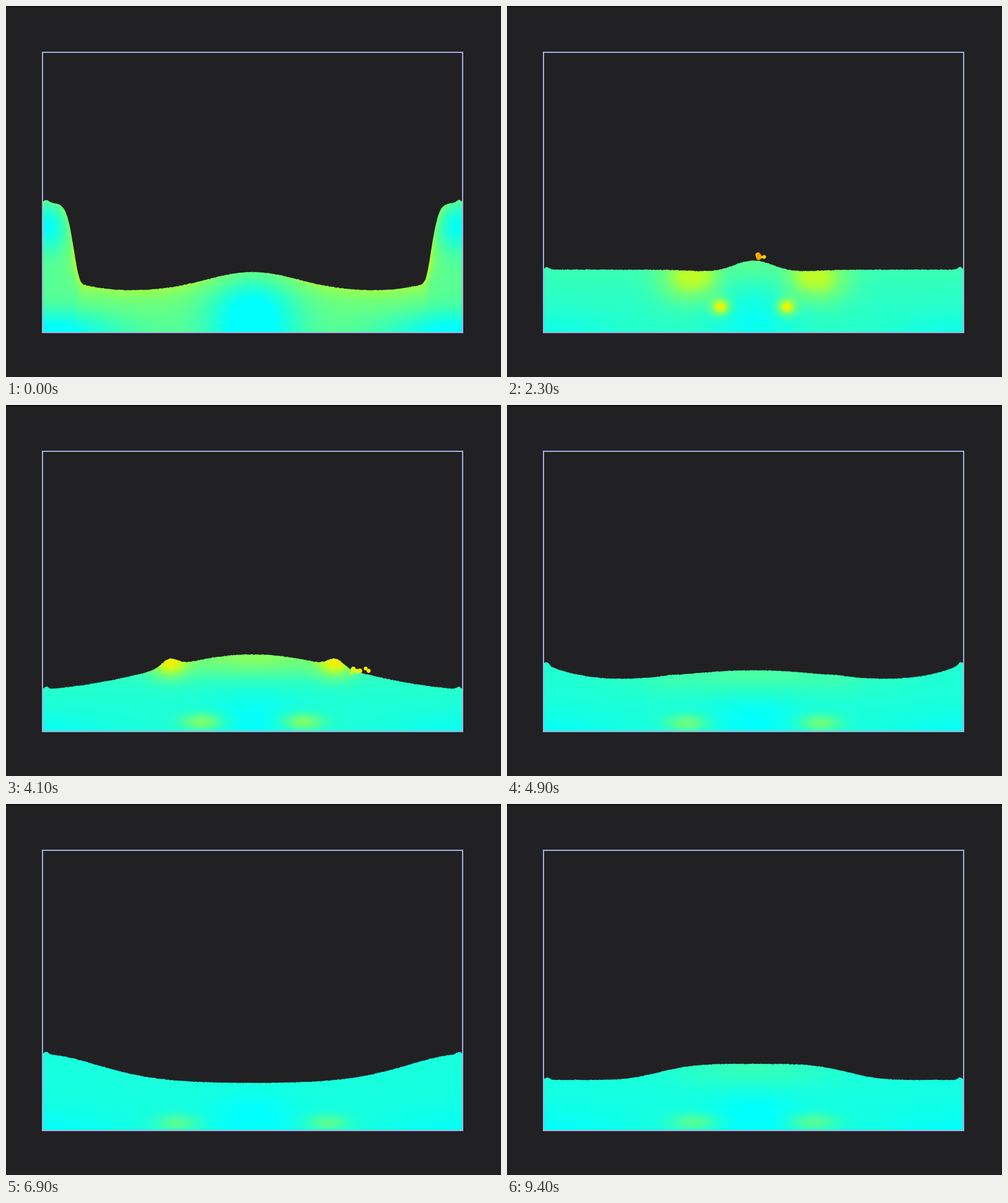
Write a matplotlib script that moves like this. It is 800 px wide and 601 px high and loops after 9500 ms.

```python
import numpy as np
import matplotlib.pyplot as plt
from matplotlib.animation import FuncAnimation
from matplotlib.colors import LinearSegmentedColormap
from matplotlib.patches import Polygon, Rectangle
from matplotlib.path import Path

W, H, DPI = 800, 601, 100
FRAMES, STEP = 95, 100
PX = 72 / DPI
LEFT, RIGHT, TOP, FLOOR = 59, 738, 75, 528
HALF = (RIGHT - LEFT) / 2
SKY = 300  # no water above this height
BACK = "#212123"

SPEED = LinearSegmentedColormap.from_list("speed", [
    (0, "#00ffff"), (0.22, "#2cffc4"), (0.5, "#72ff78"), (0.66, "#b4ff30"),
    (0.78, "#ffee00"), (0.9, "#ff9a00"), (1, "#ff4a00")])

# Sloshing: time, level, then height, width and steepness
# of the swell at the walls and of the hump in the middle
SLOSH = np.array([
    (0.0, 462, 144, 52, 7, 31, 105, 2),
    (0.6, 461, 84, 115, 7, 14, 105, 2),
    (1.2, 463, 62, 178, 7, 7, 100, 2),
    (2.3, 434, 7, 265, 10, 21, 48, 2),
    (2.7, 439, 0, 265, 7, 68, 45, 1.5),
    (3.2, 447, 0, 265, 7, 62, 85, 2),
    (4.1, 466, 0, 65, 1, 62, 215, 2),
    (5.7, 456, 80, 65, 1, 0, 215, 2),
    (6.3, 459, 74, 110, 1.5, 0, 100, 2),
    (7.1, 450, 38, 130, 2, 0, 100, 2),
    (8.2, 442, 0, 130, 2, 46, 100, 2),
    (8.7, 446, 0, 130, 2, 93, 55, 1.4),
    (9.0, 447, 0, 130, 2, 80, 75, 1.6),
    (9.4, 447, 0, 130, 2, 26, 165, 4),
])

RIPPLE = 205  # distance of the secondary crest from the wall

# Spray: time, middle x and y, spread, side drift, speed value
SPRAYS = [(1.2, 271, 457, 9, 70, 0.95), (1.2, 529, 462, 9, -70, 0.95),
          (2.3, 409, 405, 5, 10, 0.86), (4.1, 574, 430, 11, 60, 0.74)]
DROPS, LIFE, GRAVITY = 7, 0.25, 280


def bell(d, width, power=2):
    return np.exp(-(np.abs(d) / width)**power)


def slosh(t):
    return [np.interp(t, SLOSH[:, 0], col) for col in SLOSH[:, 1:].T]


def ripple(t):
    return 13 * bell(t - 4.1, 0.5) + 7 * bell(t - 5.7, 0.4)


def surface(s, t):
    """Height on the screen at distance s from the nearer wall."""
    level, swell, w, p, hump, cw, cp = slosh(t)
    return (level
            - swell * (0.85 * bell(s, w, p) + 0.15 * bell(s, 1.5 * w))
            - hump * bell(HALF - s, cw, cp)
            - ripple(t) * bell(s - RIPPLE, 18)
            - 4 * bell(s - 6, 5))


def water_outline(t, frame):
    x = np.linspace(LEFT, RIGHT, 680)
    y = surface(np.minimum(x - LEFT, RIGHT - x), t)
    y += np.random.default_rng(frame).normal(0, 0.35, len(x))
    ends = [(RIGHT, FLOOR), (LEFT, FLOOR), (LEFT, y[0])]
    return np.vstack([np.column_stack([x, y]), ends])


SX, SY = np.meshgrid(np.linspace(0.5, HALF, 340), np.arange(SKY + 0.5, FLOOR))


def glow(s, y, rx, ry):
    return np.exp(-0.5 * (((SX - s) / rx)**2 + ((SY - y) / ry)**2))


def speed_image(t):
    """Speed of the left half, mirrored to the right."""
    _, _, w, _, hump, cw, _ = slosh(t)
    fade = np.exp(-t)
    depth = np.maximum(SY - surface(SX, t), 0)
    v = 0.1 + 0.3 * np.exp(-t / 2.2)
    v = v + 0.2 * np.exp(-depth / 30 - t / 2.5)

    # Still water in the middle, the corners and the top of the columns
    v -= (0.12 + 0.4 * fade) * glow(HALF, 510, 50, 30 + 60 * fade)
    v -= (0.08 + 0.35 * fade) * glow(10, FLOOR, 80, 24)
    v -= 0.5 * fade**3 * glow(11, 350, 20, 30)

    # Running wave front and its shoulder
    front = np.interp(t, [0, 1.1, 1.8, 2.4], [0.1, 0.55, 0.5, 0])
    v += front * glow(w + 4, surface(w, t) + 8, 15, 24)
    shoulder = np.interp(t, [0, 1, 2.4, 3.2], [0.1, 0.42, 0.42, 0])
    v += shoulder * glow(w - 30, surface(w - 30, t) + 14, 34, 28)

    # Eddy that sinks after the plunge and drifts along the floor
    times = [0.9, 1.2, 2.3, 4.1, 5.7, 9.4]
    x, y, size, gain = (np.interp(t, times, col) for col in (
        [190, 203, 287, 259, 206, 244], [458, 458, 488, 513, 517, 515],
        [14, 14, 11, 24, 24, 28], [0, 0.5, 0.6, 0.42, 0.28, 0.3]))
    v += gain * glow(x, y, size, 10)

    # Middle hump and secondary crest
    v += 0.006 * hump * glow(HALF, surface(HALF, t) + 5, 0.6 * cw, 24)
    crest = surface(RIPPLE, t)
    v += 0.03 * ripple(t) * glow(RIPPLE, crest + 10, 22, 18)
    return np.hstack([v, v[:, ::-1]])


def cavity_outline(t):
    """Air trapped under the breaking wave on the left."""
    size = np.interp(t, [0.85, 1.2, 1.75], [0, 1, 0])
    a = np.linspace(0, 2 * np.pi, 40)
    y = np.where(np.sin(a) > 0, -13, -9) * np.sin(a)
    s = slosh(t)[2] - 24
    return np.column_stack([LEFT + s + 20 * size * np.cos(a), 449 + size * y])


def drops(t):
    found = []
    for seed, (peak, x, y, spread, drift, value) in enumerate(SPRAYS):
        dt = t - peak
        if abs(dt) > LIFE:
            continue
        rng = np.random.default_rng(seed)
        found += [(x + spread * rng.uniform(-1.4, 1.4) + drift * dt,
                   y + 4 * rng.uniform(-1, 1) + GRAVITY / 2 * dt**2,
                   rng.uniform(2.2, 4.5), value + rng.uniform(-0.06, 0.06))
                  for _ in range(DROPS)]
    return np.array(found).reshape(-1, 4)


fig = plt.figure(figsize=(W / DPI, H / DPI), dpi=DPI, facecolor=BACK)
ax = fig.add_axes([0, 0, 1, 1])
water = ax.imshow(speed_image(0), cmap=SPEED, vmin=0, vmax=1, aspect="auto",
                  extent=(LEFT, RIGHT, FLOOR, SKY), interpolation="bilinear")
cavities = [ax.add_patch(Polygon(cavity_outline(0), fc=BACK, lw=0))
            for _ in range(2)]
spray = ax.scatter([], [], c=[], cmap=SPEED, vmin=0, vmax=1, lw=0, zorder=3)
ax.add_patch(Rectangle((LEFT, TOP), RIGHT - LEFT, FLOOR - TOP + 0.5,
                       fill=False, ec="#a3abe0", lw=2 * PX, zorder=4))
ax.plot([0, W], [1, 1], color="#0c0c0d", lw=1.5 * PX)
ax.set(xlim=(0, W), ylim=(H, 0))
ax.axis("off")


def draw(frame):
    t = frame * STEP / 1000
    water.set_data(speed_image(t))
    water.set_clip_path(Path(water_outline(t, frame)), ax.transData)
    hole = cavity_outline(t)
    cavities[0].set_xy(hole)
    cavities[1].set_xy(hole * [-1, 1] + [LEFT + RIGHT, 0])
    d = drops(t)
    spray.set_offsets(d[:, :2])
    spray.set_sizes((2 * d[:, 2] * PX)**2)
    spray.set_array(d[:, 3])
    return water, *cavities, spray


anim = FuncAnimation(fig, draw, frames=FRAMES, interval=STEP, repeat=True)
plt.show()
```
